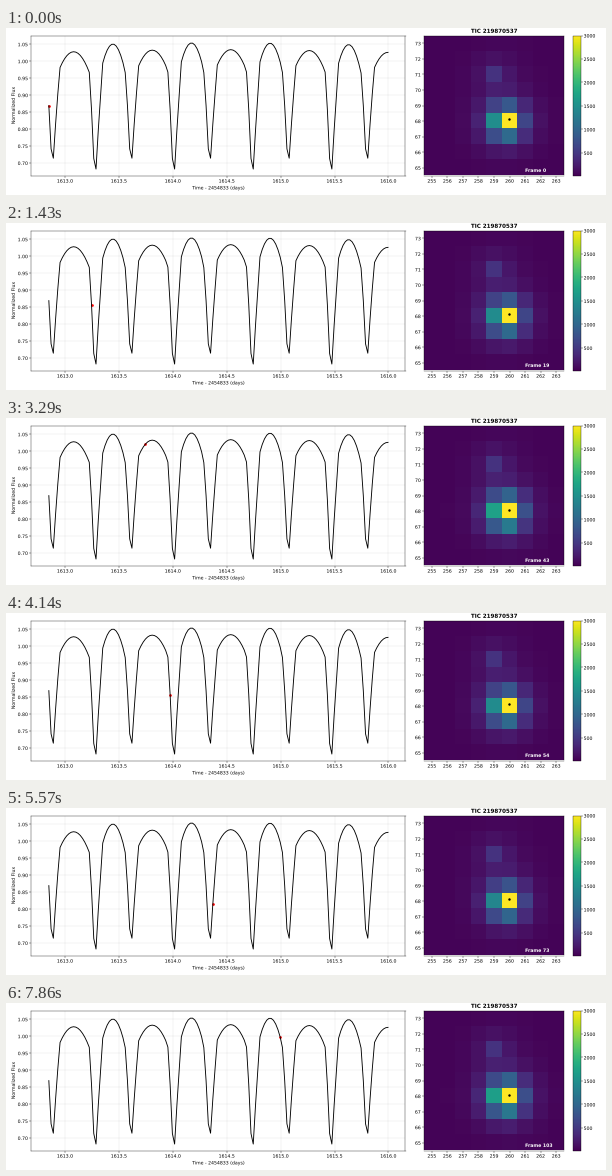
Write a matplotlib script that moves like this. It is 600x167 px and loops after 8000 ms.

```python
import matplotlib.pyplot as plt
import numpy as np
from matplotlib.animation import FuncAnimation
from matplotlib.patheffects import Normal
from matplotlib.text import Text

W, H, DPI = 600, 167, 32
LOOP_MS, TICK_MS = 8000, 50
STEPS, LAST_CADENCE = 56, 103
CADENCE = 0.0208335          # days between samples
T0, SAMPLES, PERIOD = 1612.85, 152, 35

plt.rcParams.update({"font.family": "DejaVu Sans", "font.size": 10.4})


def phase(k, mid):
    """Signed distance in samples to the nearest repeat of mid."""
    return (k - mid + PERIOD / 2) % PERIOD - PERIOD / 2


def crest(k, mid, top, curvature):
    return top - curvature * phase(k, mid) ** 2


def eclipse(k, mid, bottom, depth):
    """Steep fall, rounded floor, slightly slower recovery."""
    shape = np.interp(phase(k, mid), [-4, -2, -1, 0, 1, 4],
                      [1.4, 0.62, 0.11, 0, 0.4, 1.48])
    return bottom + depth * shape


def light_curve():
    k = np.arange(SAMPLES)
    crests = np.maximum(crest(k, 11, 1.026, 0.00126),
                        crest(k, 28.5, 1.046, 0.00274))
    crests += 0.008 * np.sin(np.pi * k / (SAMPLES - 1))
    dips = np.minimum(eclipse(k, 2, 0.714, 0.25),
                      eclipse(k, 21, 0.682, 0.283))
    return T0 + CADENCE * k, np.minimum(crests, dips)


def star(x, y, peak, falloff):
    col, row = np.meshgrid(np.arange(255, 264), np.arange(65, 74))
    return peak * np.exp(-falloff * np.hypot(col - x, row - y))


def pixel_image(flux):
    variable = star(259.75, 67.92, 6100, 1.74)
    return 45 + flux * variable + star(259.1, 71, 450, 1.4)


def pixel_axes(left, top, width, height):
    return fig.add_axes([left / W, 1 - (top + height) / H, width / W, height / H])


time, flux = light_curve()
fig = plt.figure(figsize=(W / DPI, H / DPI), dpi=DPI, facecolor="white")

curve_ax = pixel_axes(25, 7.5, 374.5, 140)
curve_ax.plot(time, flux, color="black", lw=2)
marker, = curve_ax.plot([], [], "o", color="red", ms=6, mew=0, zorder=1.9)
curve_ax.set(xlim=(1612.6846, 1616.158), ylim=(0.663, 1.0757),
             xticks=np.arange(1613, 1616.1, 0.5),
             yticks=np.arange(0.70, 1.06, 0.05),
             xlabel="Time - 2454833 (days)", ylabel="Normalized Flux")
curve_ax.xaxis.set_major_formatter("{x:.1f}")
curve_ax.yaxis.set_major_formatter("{x:.2f}")
curve_ax.grid(True, alpha=0.4)
curve_ax.set_axisbelow(True)

image_ax = pixel_axes(418, 7.5, 140, 140)
image = image_ax.imshow(pixel_image(1), cmap="viridis", vmin=20, vmax=3000,
                        origin="lower", interpolation="nearest",
                        aspect="auto", extent=(254.5, 263.5, 64.5, 73.5))
centroid, = image_ax.plot([], [], "o", color="black", ms=5.5, mew=0)
image_ax.set(xlim=(254.5, 263.5), ylim=(64.5, 73.5),
             xticks=range(255, 264), yticks=range(65, 74))
image_ax.set_title("TIC 219870537", fontweight="bold")
label = image_ax.text(261, 64.73, "", color="white", fontweight="bold")

bar_ax = pixel_axes(567, 7.5, 7.5, 140)
fig.colorbar(image, cax=bar_ax, ticks=range(500, 3001, 500))

# Small text keeps its decimal points when drawn as outlines
fig.draw_without_rendering()
for text in fig.findobj(Text):
    text.set_path_effects([Normal()])


def update(tick):
    # Each step shows from the tick in which it begins
    step = ((tick + 1) * TICK_MS - 1) * STEPS // LOOP_MS
    k = round(step * LAST_CADENCE / (STEPS - 1))
    marker.set_data([time[k]], [flux[k]])
    image.set_data(pixel_image(flux[k]))
    centroid.set_data([259.98], [68.05 + 0.45 * (1 - flux[k])])
    label.set_text(f"Frame {k}")
    return marker, image, centroid, label


anim = FuncAnimation(fig, update, frames=LOOP_MS // TICK_MS, interval=TICK_MS,
                     init_func=lambda: update(0), repeat=True,
                     repeat_delay=0, blit=False)
plt.show()
```
